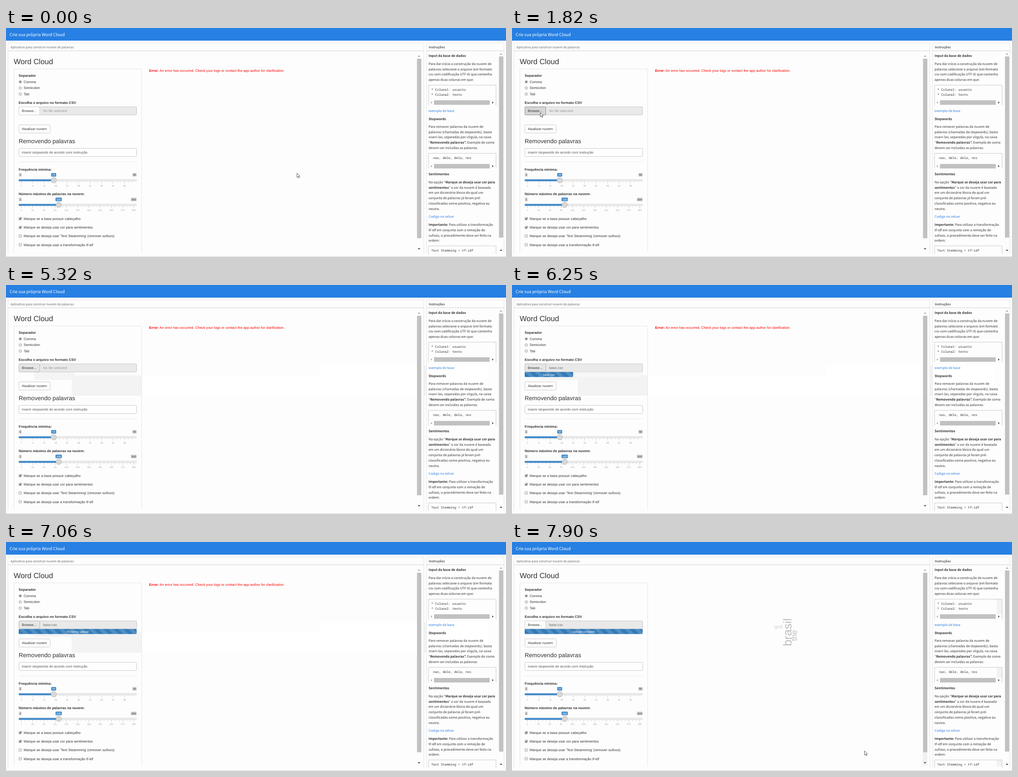
An HTML page that plays this animation: 1104 px wide and 507 px high, repeating every 8000 ms.

```html
<!DOCTYPE html>
<html lang="pt">
<head>
<meta charset="utf-8">
<title>Word Cloud</title>
<style>
  html, body { margin: 0; width: 100%; height: 100%; overflow: hidden; background: #fdfdfd; }
  svg { display: block; width: 1104px; height: 507px; }
  text { font: 7.71px Arial, "Liberation Sans", sans-serif; fill: #333; white-space: pre; text-rendering: geometricPrecision; }
  .side { font: 7.29px "Noto Sans CJK KR", "Noto Sans CJK JP", "Noto Sans CJK SC", "Open Sans", sans-serif; }
  .mono { font: 7.05px "Noto Sans Mono", "DejaVu Sans Mono", monospace; }
  .bold { font-weight: bold; }
  .mid { text-anchor: middle; }
</style>
</head>
<body>
<svg id="stage" viewBox="0 0 1104 507">
  <defs>
    <pattern id="stripes" x="28" y="192.6" width="22" height="22" patternUnits="userSpaceOnUse">
      <rect width="22" height="22" fill="#337ab7"/>
      <path d="M0 11L11 22H0zM0 0H11L22 11V22z" fill="#fff" fill-opacity=".15"/>
    </pattern>
    <clipPath id="panes"><rect width="1104" height="500"/></clipPath>
  </defs>
</svg>
<script>
const LOOP = 8000;
const stage = document.getElementById('stage');

// ---- markup helpers ----
const rect = (x, y, w, h, fill, extra = '') => `<rect x="${x}" y="${y}" width="${w}" height="${h}" fill="${fill}" ${extra}/>`;
const box = (x, y, w, h, fill, stroke, r = 0, extra = '') =>
  rect(x + .5, y + .5, w - 1, h - 1, fill, `stroke="${stroke}" rx="${r}" ${extra}`);
const path = (d, fill, extra = '') => `<path d="${d}" fill="${fill}" ${extra}/>`;
const line = (d, stroke, width = 1) => path(d, 'none', `stroke="${stroke}" stroke-width="${width}"`);
const group = (id, content, extra = '') => `<g id="${id}" ${extra}>${content}</g>`;

// **words** between double asterisks are set in bold
const text = (x, y, str, cls = '', style = '', extra = '') =>
  `<text x="${x}" y="${y}" class="${cls}" style="${style}" ${extra}>${
    str.replace(/\*\*(.+?)\*\*/g, '<tspan class="bold">$1</tspan>')}</text>`;
const paragraph = (y, lines) => lines.map((s, i) => text(933, y + i * 11.8, s, 'side')).join('');

const arrow = (x, y, dx, dy, fill) => path(
  dx ? `M${x + 1.5 * dx} ${y}l${-3 * dx}-2.5v5z` : `M${x} ${y + 1.5 * dy}l-3 ${-3 * dy}h6z`, fill);

function codeBox(y, h, lines, x = 939) {
  return line(`M933 ${y + h}V${y + .5}H1082V${y + h}`, '#c9c9c9')
    + lines.map((s, i) => text(x, y + 13 + i * 10.7, s, 'mono')).join('');
}
const codeScroll = y => rect(945, y, 123, 10, '#c1c1c1')
  + arrow(939, y + 5, -1, 0, '#a3a3a3') + arrow(1075, y + 5, 1, 0, '#444');

function slider(y, value, x, min, max, step) {
  const tag = (cx, w, s, fill, color) => rect(cx - w / 2, y - 16, w, 8, fill, 'rx="1.5"')
    + text(cx, y - 9.9, s, 'mid', `font-size:6px;fill:${color}`);
  let grid = '';
  for (let v = min, tick = 0; v < max + step / 6; v += step / 3, tick++) {
    const px = 34 + 248 * Math.min(1, (v - min) / (max - min));
    const big = tick % 3 === 0;
    grid += line(`M${px} ${y + 2.5}v${big ? 4.5 : 2.5}`, big ? '#aaa' : '#bbb', .6);
    if (big) grid += text(px, y + 13.8, '' + Math.min(max, Math.round(v)), 'mid', 'font-size:5px;fill:#999');
  }
  const wide = max > 99 ? 13 : 9.5;
  return tag(31.5, 6.5, '' + min, '#d4d4d4', '#333') + tag(288.5 - wide / 2, wide, '' + max, '#d4d4d4', '#333')
    + tag(x, value > 99 ? 14 : 11, '' + value, '#428bca', '#fff')
    + grid + rect(28.3, y - 1.7, 260, 3.6, '#ececec', 'stroke="#ccc" stroke-width=".6" rx="1.5"')
    + rect(28, y - 2, x - 28, 4.2, '#428bca', 'rx="1.5"')
    + `<circle cx="${x}" cy="${y}" r="6" fill="#d8d8d8" stroke="#aaa" stroke-width=".8"/>`;
}

function radio(y, label, on) {
  return `<circle cx="31.5" cy="${y}" r="3" fill="#e4e4e4" stroke="#999" stroke-width=".8"/>`
    + (on ? `<circle cx="31.5" cy="${y}" r="1.5" fill="#444"/>` : '') + text(39, y + 2.5, label);
}
function check(y, label, on) {
  return rect(28.5, y - 3, 5.8, 5.8, '#e9e9e9', 'stroke="#999" stroke-width=".8" rx=".8"')
    + (on ? line(`M29.6 ${y}l1.4 1.6 2.4-3.6`, '#222', 1.2) : '') + text(39, y + 2.6, label);
}

// ---- parts of the page ----
const frame = rect(0, 0, 1104, 28, '#2780e3')
  + text(8, 17.7, 'Crie sua própria Word Cloud', 'side', 'font-size:9.32px;fill:#fff')
  + box(4, 33, 919, 468, 'none', '#e6e6e6') + box(928, 33, 172, 468, 'none', '#e6e6e6')
  + line('M4 50.5H923M928 50.5H1100', '#d0d0d0')
  + text(10, 45.3, 'Aplicativo para construir nuvem de palavras', 'side', 'font-size:6.88px;fill:#666')
  + text(933.5, 45.3, '**Instruções**', 'side', 'font-size:6.88px;fill:#555')
  + rect(907.5, 68, 9.5, 397.5, '#c1c1c1') + arrow(912, 62, 0, -1, '#a3a3a3') + arrow(912, 489, 0, 1, '#444')
  + rect(1088.5, 63, 9.5, 401, '#c1c1c1') + arrow(1093, 57.5, 0, -1, '#a3a3a3') + arrow(1093, 492.5, 0, 1, '#444');

const controls = text(17, 80.3, 'Word Cloud', '', 'font-size:16.5px')
  + line('M17.5 496V92Q17.5 90.5 19 90.5H298Q299.5 90.5 299.5 92V496', '#e5e5e5')
  + text(28, 108, '**Separador**')
  + radio(119.2, 'Comma', true) + radio(132.8, 'Semicolon') + radio(146.3, 'Tab')
  + text(28, 168, '**Escolha o arquivo no formato CSV**')
  + box(28, 174, 261, 19, '#e9e9e9', '#c8c8c8', 2)
  + box(28, 174, 47, 19, '#fff', '#ccc', 2, 'id="browse"') + text(35, 185.8, 'Browse...')
  + text(82, 185.8, '', '', '', 'id="file"')
  + box(28, 214, 70, 19, '#fff', '#c8c8c8', 2) + text(35, 226.3, 'Atualizar nuvem')
  + text(28, 255, 'Removendo palavras', '', 'font-size:13.2px')
  + box(28, 266, 261, 19, '#fff', '#c8c8c8', 2)
  + text(35, 278.4, 'inserir stopwords de acordo com instrução', '', 'fill:#555')
  + rect(28, 296, 261, 1, '#ebebeb')
  + text(28, 315.6, '**Frequência mínima:**') + slider(337, 15, 105.3, 1, 50, 5)
  + text(28, 370, '**Número máximo de palavras na nuvem:**') + slider(391.5, 100, 116.3, 1, 300, 30)
  + check(422.2, 'Marque se a base possuir cabeçalho', true)
  + check(441.5, 'Marque se deseja usar cor para sentimentos', true)
  + check(460.6, "Marque se deseja usar 'Text Steamming' (remover sufixos)")
  + check(480, 'Marque se deseja usar a transformação tf-idf');

const help = text(933, 63.8, '**Input da base de dados**', 'side')
  + paragraph(81.7, ['Para dar início a construção da nuvem de', 'palavras selecione o arquivo (em formato',
    'csv com codificação UTF-8) que contenha', 'apenas duas colunas em que:'])
  + codeBox(126, 45, ['* Coluna1: usuario', '* Coluna2: texto']) + codeScroll(160)
  + text(933, 185.6, 'exemplo de base', 'side', 'fill:#2f7fe0')
  + text(933, 203.6, '**Stopwords**', 'side')
  + paragraph(220.8, ['Para remover palavras da nuvem de', 'palavras (chamadas de stopwords), basta',
    'inseri-las, separadas por vírgula, na caixa', '“**Removendo palavras”.** Exemplo de como',
    'devem ser incluidas as palavras:'])
  + codeBox(277, 34, ['nao, dele, dela, nos'], 943) + codeScroll(301)
  + text(933, 326.2, '**Sentimentos**', 'side')
  + paragraph(343.8, ['Na opção “**Marque se deseja usar cor para**', '**sentimentos**” a cor da nuvem é baseada',
    'em um dicionário léxico do qual um', 'conjunto de palavras já foram pré-',
    'classificadas como positiva, negativa ou', 'neutra.'])
  + text(933, 420.2, 'Codigo no zelvar', 'side', 'fill:#2f7fe0')
  + paragraph(437.9, ['**Importante:** Para utilizar a transformação', 'tf-idf em conjunto com a remoção de',
    'sufixos, o procedimento deve ser feito na', 'ordem:'])
  + codeBox(482, 18, ['Text Stemming &gt; tf-idf']);

const patches = group('patchA', rect(62, 187, 90, 23, '#f4f4f4'))
  + group('patchB', rect(145, 200, 155, 45, '#f3f3f3') + rect(300, 200, 394, 45, '#fff'))
  + group('patchC', rect(694, 178, 370, 67, '#fff') + rect(923, 178, 5, 67, '#f3f3f3'))
  + group('patchD', rect(1070, 126, 12, 33, '#f2f2f2') + rect(1070, 277, 12, 23, '#f2f2f2') + rect(1070, 482, 12, 14, '#f2f2f2'))
  + group('patchE', rect(907, 465, 10, 30, '#f1f1f1'));

const upward = (x, y, size, s, id) =>
  text(0, 0, s, '', `font-size:${size}px;fill:#bebebe`, `id="${id}" transform="translate(${x} ${y})rotate(-90)"`);

stage.insertAdjacentHTML('beforeend', patches
  + `<g clip-path="url(#panes)">${frame}${controls}${help}</g>` + rect(0, 506, 1104, 1, '#cfcfcd')
  + text(316, 97, '**Error:** An error has occurred. Check your logs or contact the app author for clarification.', '', 'fill:#f00', 'id="error"')
  + group('progress', rect(28, 192.6, 260.5, 11.2, '#f6f6f6', 'rx="2"')
    + rect(28, 192.6, 0, 11.2, 'url(#stripes)', 'id="bar" rx="2"')
    + text(0, 200.6, '', 'mid', 'font-size:6.65px;fill:#fff', 'id="status"'))
  + upward(616.5, 230.5, 25.7, 'brasil', 'word1') + upward(629.3, 219, 17.3, 'the', 'word2')
  + text(579.5, 191, 'god', '', 'font-size:10.8px;fill:#d0d0d0', 'id="word3"')
  + group('cursor', path('M.5 .5V9.8L2.7 7.8 4.2 11.2 5.6 10.6 4.2 7.2H7z', '#fff', 'stroke="#333" stroke-width=".8"')));

// ---- timeline: each entry is [time, ...values], held until the next one ----
const pointer = [[0, 642, 321], [380, 638, 321], [530, 598, 316], [650, 510, 304], [800, 318, 254],
  [930, 144, 210], [1080, 111, 194], [1230, 68, 189], [1390, 57, 181], [1670, 62, 181], [1820, 62, 187],
  [2560, 145, 199], [2710, 687, 234], [2830, 1057, 178], [2980], [7330, 1091, 63], [7480, 777, 462],
  [7630, 908, 473], [7750, 1040, 484], [7900, 778, 462]];
const upload = [[0, 28], [5590, 30], [5710, 43], [5860, 67], [5980, 91], [6130, 113], [6250, 135],
  [6400, 171], [6560, 200], [6700, 233], [6820, 262], [6940, 283], [7060, 288.5]];
const button = [[0, '#fff', '#ccc'], [1390, '#e6e6e6', '#adadad'], [1820, '#d6d6d6', '#8c8c8c'],
  [1970, '#e6e6e6', '#b5b5b5'], [7330, '#fff', '#ccc']];
const held = (track, t) => track.findLast(step => step[0] <= t).slice(1);

const $ = id => document.getElementById(id);
const set = (id, attrs) => { for (const name in attrs) $(id).setAttribute(name, attrs[name]); };
const show = (id, visible) => set(id, { opacity: +visible });

function draw(t) {
  const [x, y] = held(pointer, t);
  show('cursor', x !== undefined);
  if (x !== undefined) set('cursor', { transform: `translate(${x} ${y})` });

  const [fill, stroke] = held(button, t);
  set('browse', { fill, stroke });
  $('file').textContent = t < 5440 ? 'No file selected' : 'base.csv';
  $('file').style.fill = t < 5440 ? '#999' : '#666';

  const [end] = held(upload, t);
  show('progress', t >= 5440);
  set('bar', { width: end - 28 });
  set('status', { x: (28 + end) / 2 });
  $('status').textContent = t >= 7210 ? 'Upload complete' : t >= 7060 ? 'Finishing upload' : end > 60 ? 'base.csv' : '';

  show('patchA', t >= 2560 && t < 7210);
  show('patchB', t >= 2710 && t < 7210);
  show('patchC', t >= 2830 && t < 7210);
  show('patchD', t >= 7480);
  show('patchE', t >= 7630);
  set('error', { opacity: t < 7210 ? 1 : t < 7330 ? .3 : 0 });
  show('word1', t >= 7630);
  show('word2', t >= 7750);
  show('word3', t >= 7750);
}

const start = performance.now();
function tick() {
  draw((performance.now() - start) % LOOP);
  requestAnimationFrame(tick);
}
tick();
</script>
</body>
</html>
```
